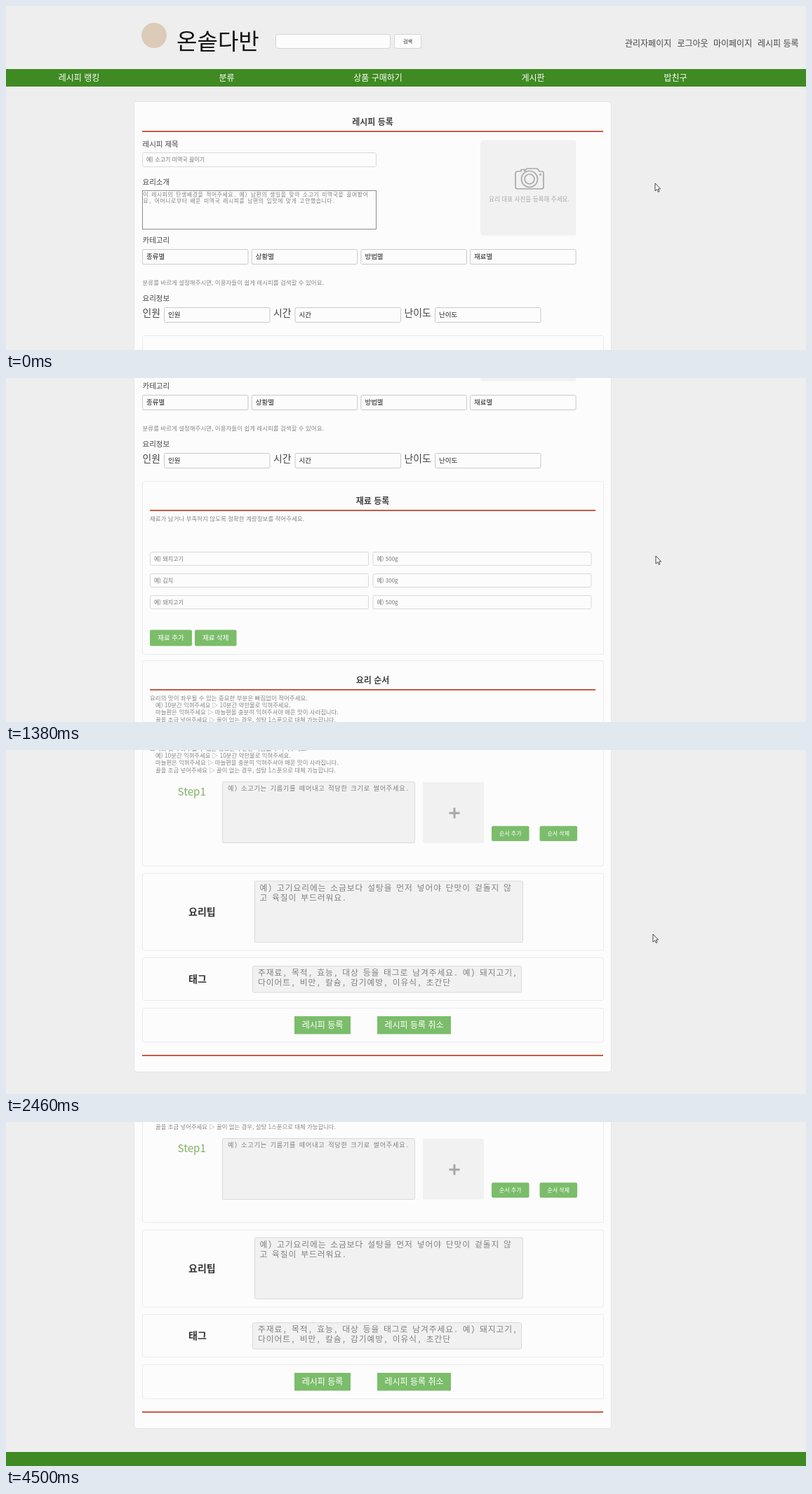
Recreate the animation shown at these times as an HTML page. Size 1140 px wide and 491 px high, loop 4540 ms.

```html
<!DOCTYPE html>
<html lang="ko">
<head>
<meta charset="utf-8">
<title>레시피 등록</title>
<style>
  html, body { margin: 0; width: 100%; height: 100%; overflow: hidden; background: #eeeeee; }
  svg { display: block; }
  text { font-family: "Noto Sans CJK KR", "Noto Sans CJK", sans-serif; white-space: pre; }
  /* Spacing gives full-width syllables and half-width blanks. */
  .mono {
    font-family: "Noto Sans Mono CJK KR", "Noto Sans CJK KR", monospace; font-weight: 300;
    letter-spacing: .08em; word-spacing: -.08em;
  }
</style>
</head>
<body>
<svg id="stage" width="1140" height="491" viewBox="0 0 1140 491">
  <g id="page"></g>
  <path id="cursor" d="M0 0V11L2.6 8.7L4.4 12.4L6 11.6L4.3 8H7.6Z" fill="#fff" stroke="#333" stroke-width=".9"/>
</svg>
<script>
const LOOP = 4540;
const GREEN = '#3f8a22', BUTTON = '#7bbd6a', RED = '#c65b48', PAPER = '#fcfcfc', FIELD = '#f1f1f1';
const page = document.getElementById('page');
const cursor = document.getElementById('cursor');

function add(tag, attrs, content) {
  const el = document.createElementNS('http://www.w3.org/2000/svg', tag);
  for (const key in attrs) el.setAttribute(key, attrs[key]);
  if (content) el.textContent = content;
  page.append(el);
}

// Boxes are given by their edges; outlines sit on pixel centres.
function box(left, top, right, bottom, fill, stroke, rx = 2) {
  const inset = stroke ? 0.5 : 0;
  add('rect', {
    x: left + inset, y: top + inset, rx, fill, stroke: stroke || 'none',
    width: right - left - 2 * inset, height: bottom - top - 2 * inset
  });
}

function text(x, y, size, content, fill = '#444', more = {}) {
  add('text', { x, y, 'font-size': size, fill, ...more }, content);
}

const centered = { 'text-anchor': 'middle' };
const bold = { 'font-weight': 700 };
const mono = (x, y, size, content) => text(x, y, size, content, '#808080', { class: 'mono' });
const label = (y, content) => text(194.5, y, 10.5, content);
const hint = (x, y, content, size = 8.5) => text(x, y, size, content, '#888');

function input(left, top, right, bottom, content, size = 8, fill = '#777') {
  box(left, top, right, bottom, PAPER, size > 8 ? '#c9c9d0' : '#d9d9df');
  text(left + 6, (top + bottom) / 2 + size * 0.36, size, content, fill);
}

function button(left, top, right, bottom, size, content, rx = 2) {
  box(left, top, right, bottom, BUTTON, null, rx);
  text((left + right) / 2, (top + bottom) / 2 + size * 0.36, size, content, '#fff', centered);
}

const rule = (left, right, y) => box(left, y, right, y + 2, RED, null, 0);

function heading(y, content, left, right) {
  text(522.5, y, 12, content, '#444', { ...centered, ...bold });
  rule(left, right, Math.round(y + 8.5));
}

const section = (top, bottom) => box(194, top, 852, bottom, PAPER, '#ebebee', 3);

function drawHeader() {
  add('circle', { cx: 211, cy: 42, r: 18, fill: '#dccbb8' });
  text(243, 62, 32, '온솥다반', '#111', { 'font-weight': 500 });
  box(384, 40, 548, 61, PAPER, '#d4d4d8', 3);
  box(553, 40, 592, 61, PAPER, '#d4d4d8', 3);
  text(572.5, 53, 7.2, '검색', '#222', centered);
  [[882, '관리자페이지'], [956.5, '로그아웃'], [1008, '마이페이지'], [1071, '레시피 등록']]
    .forEach(([x, s]) => text(x, 58, 12, s));
  box(0, 90, 1140, 115, GREEN, null, 0);
  [[104, '레시피 랭킹'], [314.5, '분류'], [530, '상품 구매하기'], [751, '게시판'], [954, '밥친구']]
    .forEach(([x, s]) => text(x, 107.3, 12, s, '#fff', centered));
}

function drawPhotoSlot() {
  box(676, 191.5, 812.5, 327.5, FIELD, null, 4);
  const line = { fill: 'none', stroke: '#a9a9a9', 'stroke-width': 1.7 };
  add('path', { ...line, 'stroke-linejoin': 'round',
    d: 'M729 236H734V233.5H739V236L742 232H757L760 236H763Q766 236 766 239V258Q766 261 763 261H729Q726 261 726 258V239Q726 236 729 236Z' });
  add('circle', { ...line, cx: 746, cy: 247, r: 11.5 });
  add('circle', { ...line, cx: 746, cy: 247, r: 7 });
  add('circle', { cx: 761.5, cy: 240.5, r: 1.5, fill: '#a9a9a9' });
  text(745.5, 279, 8.6, '요리 대표 사진을 등록해 주세요.', '#aaa', centered);
}

function drawBasics() {
  heading(169.7, '레시피 등록', 194, 851);
  label(201, '레시피 제목');
  input(194, 209, 528, 230, '예) 소고기 미역국 끓이기');
  label(255, '요리소개');
  box(194, 263, 528, 319, PAPER, '#8c8c8c', 0);
  mono(195.5, 272, 7.8, '이 레시피의 탄생배경을 적어주세요. 예) 남편의 생일을 맞아 소고기 미역국을 끓여봤어');
  mono(195.5, 281.3, 7.8, '요, 어머니로부터 배운 미역국 레시피를 남편의 입맛에 맞게 고안했습니다.');
  drawPhotoSlot();
  label(338, '카테고리');
  ['종류별', '상황별', '방법별', '재료별'].forEach((s, i) => {
    const x = 194 + i * 155.7;
    input(x, 347, x + 151.5, 369, s, 9.5, '#222');
  });
  hint(194.5, 397.5, '분류를 바르게 설정해주시면, 이용자들이 쉽게 레시피를 검색할 수 있어요.');
  label(421, '요리정보');
  [[194.5, 225, '인원'], [381, 411.5, '시간'], [567.5, 611, '난이도']].forEach(([x, left, s]) => {
    text(x, 443, 13.8, s);
    input(left, 430, left + 151.5, 452, s, 9.5, '#222');
  });
}

function drawIngredients() {
  section(470, 718);
  heading(502.5, '재료 등록', 205, 840);
  hint(205, 527, '재료가 남거나 부족하지 않도록 정확한 계량정보를 적어주세요.');
  [['돼지고기', '500g'], ['김치', '300g'], ['돼지고기', '500g']].forEach(([food, amount], i) => {
    const y = 571 + i * 31;
    input(205, y, 517, y + 20, '예) ' + food);
    input(522.5, y, 834.5, y + 20, '예) ' + amount);
  });
  button(205, 682.5, 265, 705.5, 9.5, '재료 추가');
  button(269, 682.5, 328.5, 705.5, 9.5, '재료 삭제');
}

function drawSteps() {
  section(726, 948);
  heading(758.7, '요리 순서', 205, 840);
  hint(205, 782.5, '요리의 맛이 좌우될 수 있는 중요한 부분은 빠짐없이 적어주세요.');
  ['예) 10분간 익혀주세요 ▷ 10분간 약한불로 익혀주세요.',
    '마늘편은 익혀주세요 ▷ 마늘편을 충분히 익혀주셔야 매운 맛이 사라집니다.',
    '꿀을 조금 넣어주세요 ▷ 꿀이 없는 경우, 설탕 1스푼으로 대체 가능합니다.']
    .forEach((s, i) => hint(213, 793 + i * 10.4, s, 8.4));
  text(244.5, 847.3, 15.2, 'Step1', '#7fb265');
  box(308, 827, 583, 915, FIELD, '#dadade');
  mono(316, 840, 9.2, '예) 소고기는 기름기를 떼어내고 적당한 크기로 썰어주세요.');
  box(594, 828, 681, 914.5, FIELD, null, 2);
  add('path', { d: 'M639 864.5V879.5M631.5 872H646.5', stroke: '#a8a8a8', 'stroke-width': 3 });
  button(692, 890.5, 745.5, 912, 8, '순서 추가');
  button(760.5, 890.5, 814, 912, 8, '순서 삭제');
}

function drawTipsAndTags() {
  section(957.5, 1068.5);
  text(260, 1017.5, 14, '요리팁', '#333', bold);
  box(354, 968.5, 737, 1057, FIELD, '#dadade');
  mono(361.5, 983, 11.75, '예) 고기요리에는 소금보다 설탕을 먼저 넣어야 단맛이 겉돌지 않');
  mono(361.5, 997, 11.75, '고 육질이 부드러워요.');
  section(1078, 1140);
  text(260, 1114, 14, '태그', '#333', bold);
  box(351, 1090, 735, 1128.5, FIELD, '#dadade');
  mono(359, 1104.3, 11.75, '주재료, 목적, 효능, 대상 등을 태그로 남겨주세요. 예) 돼지고기,');
  mono(359, 1118, 11.75, '다이어트, 비만, 칼슘, 감기예방, 이유식, 초간단');
}

function drawSubmit() {
  section(1150, 1199.5);
  button(411, 1162, 491, 1187.5, 12, '레시피 등록', 0);
  button(529, 1162, 634, 1187.5, 12, '레시피 등록 취소', 0);
  rule(194, 851, 1217);
}

drawHeader();
box(182, 136, 863, 1242, '#e5e5e9', null, 5);
box(183, 137, 862, 1241, PAPER, null, 4);
drawBasics();
drawIngredients();
drawSteps();
drawTipsAndTags();
drawSubmit();
box(0, 1275, 1140, 1310, GREEN, null, 0);

// Each wheel notch glides the page by a fixed distance until it reaches its end.
const NOTCHES = [700, 1200, 1460, 1730, 2338];
const NOTCH_SIZE = 164, NOTCH_TIME = 260, PAGE_END = 804;
const clamp = v => Math.max(0, Math.min(1, v));

function scrollAt(t) {
  return NOTCHES.reduce((y, start, i) => {
    const distance = Math.min(NOTCH_SIZE, PAGE_END - i * NOTCH_SIZE);
    return y + distance * (1 - (1 - clamp((t - start) / NOTCH_TIME)) ** 3);
  }, 0);
}

// time, x, y
const CURSOR_PATH = [
  [0, 925, 253], [1040, 925, 253], [1380, 926, 254], [1830, 923, 264],
  [2460, 922, 263], [2710, 920.5, 266.5], [3080, 920.5, 266.5], [3400, 1150, 290], [LOOP, 1150, 290]
];

function cursorAt(t) {
  const i = CURSOR_PATH.findIndex(key => key[0] > t);
  const [t0, x0, y0] = CURSOR_PATH[i - 1], [t1, x1, y1] = CURSOR_PATH[i];
  const p = (t - t0) / (t1 - t0);
  return [x0 + (x1 - x0) * p, y0 + (y1 - y0) * p];
}

function render(now) {
  const t = now % LOOP;
  page.setAttribute('transform', `translate(0 ${-Math.round(scrollAt(t))})`);
  cursor.setAttribute('transform', `translate(${cursorAt(t)})`);
  requestAnimationFrame(render);
}
render(0);
</script>
</body>
</html>
```
